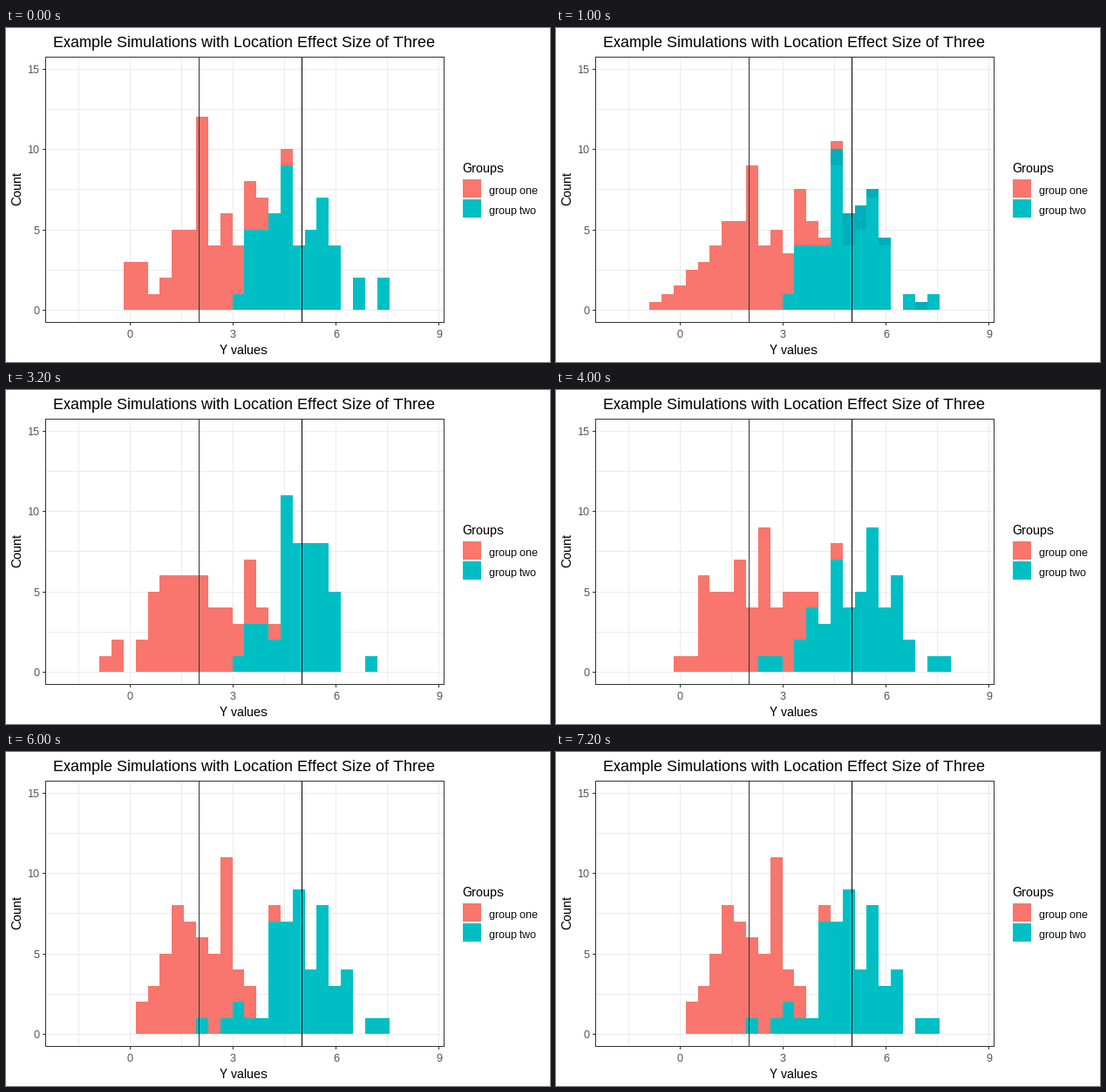
Animation of 624 by 384 pixels, one loop 8000 ms. Source, as a matplotlib script:

```python
import numpy as np
import matplotlib.pyplot as plt
from matplotlib.animation import FuncAnimation
from matplotlib.patches import Rectangle

plt.rcParams.update({
    "font.family": "Liberation Sans",
    "text.hinting": "default",
    "text.hinting_factor": 1,
    "toolbar": "None",
})

W, H, DPI = 624, 384, 96
RED, TEAL, DEEP = "#F8766D", "#00BFC4", "#00AEBA"
FRAME, GRID, TICK_TEXT = "#333333", "#EBEBEB", "#4D4D4D"
LEFT, RIGHT, TOP, BOTTOM = 45, 502, 33, 338
BINS = 25


def counts(first, values):
    out = np.zeros(BINS)
    out[first:first + len(values)] = values
    return out


# Bin counts of each simulation: first occupied bin, then the counts
ONE = [
    counts(2, [3, 3, 1, 2, 5, 5, 12, 4, 6, 3, 3, 2, 0, 1]),
    counts(0, [1, 2, 0, 2, 5, 6, 6, 6, 6, 4, 4, 2, 4, 1, 1]),
    counts(2, [1, 1, 6, 5, 5, 7, 4, 8, 3, 5, 3, 1, 0, 1]),
    counts(3, [2, 3, 5, 8, 7, 5, 5, 10, 2, 2, 0, 1]),
]
TWO = [
    counts(11, [1, 5, 5, 6, 9, 4, 5, 7, 4, 0, 2, 0, 2]),
    counts(11, [1, 3, 3, 2, 11, 8, 8, 8, 5, 0, 0, 1]),
    counts(9, [1, 1, 0, 2, 4, 3, 7, 4, 5, 9, 4, 6, 2, 0, 1, 1]),
    counts(8, [1, 0, 1, 2, 1, 1, 7, 7, 9, 4, 8, 3, 4, 0, 1, 1]),
]
# Simulation shown in each second; a half is midway between two
STEPS = [0, 0.5, 1, 1, 2, 2, 3, 3]

fig = plt.figure(figsize=(W / DPI, H / DPI), dpi=DPI, facecolor="white")
ax = fig.add_axes([0, 0, 1, 1])
ax.set(xlim=(0, W), ylim=(H, 0))
ax.axis("off")


def box(x0, y0, x1, y1, color, z=1):
    return ax.add_patch(Rectangle((x0, y0), x1 - x0, y1 - y0, fc=color,
                                  lw=0, antialiased=False, zorder=z))


def label(x, y, text, px, color="black", ha="left", **kw):
    ax.text(x, y, text, fontsize=px * 72 / DPI, color=color, ha=ha,
            va=kw.pop("va", "baseline"), **kw)


def x_px(value):
    return int(round(142 + 39.33 * value))


def y_px(count):
    return int(round(324 - 18.47 * count))


def vline(x, color, z):
    box(x, TOP, x + 1, BOTTOM, color, z)


def hline(y, color, z):
    box(LEFT, y, RIGHT, y + 1, color, z)


# Grid, ticks and tick labels
for v in np.arange(-1.5, 9.1, 1.5):
    vline(x_px(v), GRID, 1)
for c in np.arange(0, 15.1, 2.5):
    hline(y_px(c), GRID, 1)
for v in (0, 3, 6, 9):
    x = x_px(v)
    box(x, BOTTOM, x + 1, BOTTOM + 4, FRAME)
    label(x + 0.5, 356, str(v), 12, TICK_TEXT, "center")
for c in (0, 5, 10, 15):
    y = y_px(c)
    box(LEFT - 3, y, LEFT, y + 1, FRAME)
    label(39, y + 5, str(c), 12, TICK_TEXT, "right")

# Group means and panel border
vline(x_px(2), "#333333", 5)
vline(x_px(5), "black", 5)
for x in (LEFT, RIGHT):
    box(x, TOP, x + 1, BOTTOM + 1, FRAME, 6)
for y in (TOP, BOTTOM):
    hline(y, FRAME, 6)

# Titles and legend
label(273, 22, "Example Simulations with Location Effect Size of Three", 18,
      ha="center")
label(272.5, 375, "Y values", 15, ha="center")
label(20, 185, "Count", 15, ha="right", va="center", rotation=90)
label(523, 166, "Groups", 15)
for y, color, name in ((174, RED, "group one"), (197, TEAL, "group two")):
    box(524, y, 545, y + 21, color)
    label(554, y + 17, name, 12)

edges = [int(round(107.2 + 13.85 * i)) for i in range(BINS + 1)]
bars = [[box(a, 324, b, 324, color, 3) for color in (TEAL, DEEP, RED)]
        for a, b in zip(edges, edges[1:])]


def draw(n):
    step = STEPS[n % len(STEPS)]
    lo, hi = int(np.floor(step)), int(np.ceil(step))
    mix = step - lo
    one = (1 - mix) * ONE[lo] + mix * ONE[hi]
    two = (1 - mix) * TWO[lo] + mix * TWO[hi]
    # The newly grown part of group two is darker midway
    old = np.minimum(two, TWO[lo])
    for i, parts in enumerate(bars):
        levels = [0, old[i], two[i], two[i] + one[i]]
        for part, a, b in zip(parts, levels, levels[1:]):
            part.set_y(y_px(b))
            part.set_height(y_px(a) - y_px(b))
            part.set_visible(b > a)
    return [p for parts in bars for p in parts]


anim = FuncAnimation(fig, draw, frames=len(STEPS), init_func=lambda: draw(0),
                     interval=1000, repeat=True, repeat_delay=0, blit=False)
plt.show()
```
